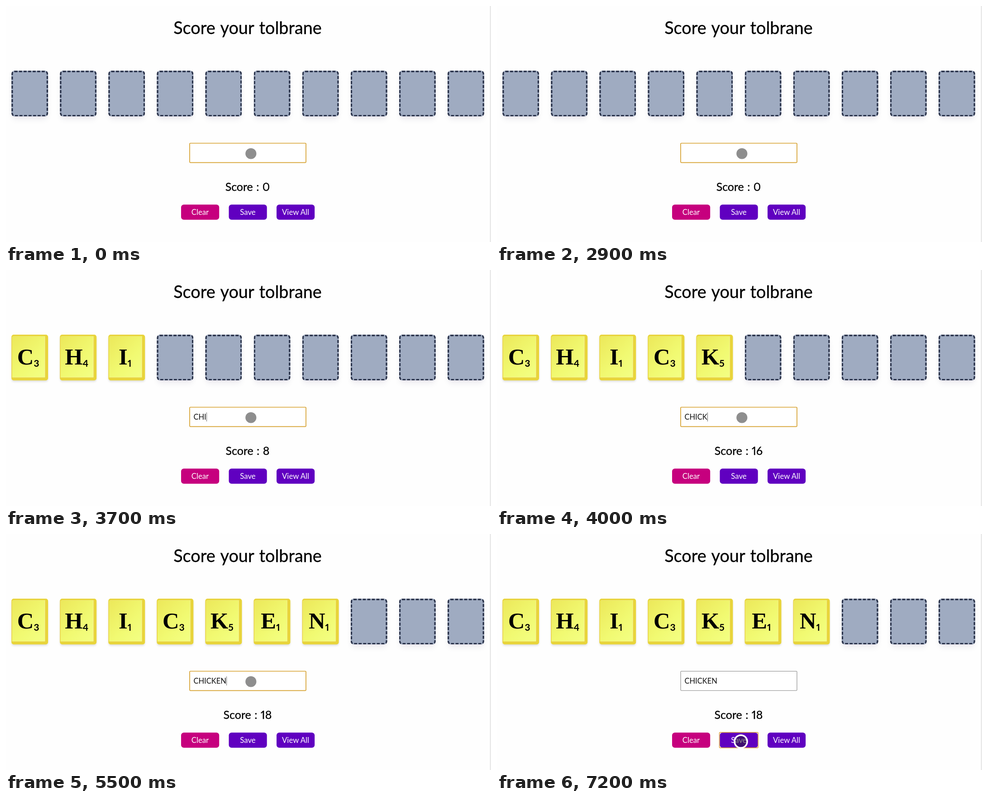
These frames come from a looping animation (1072x522 px, 8 s). An HTML page:

```html
<!DOCTYPE html>
<html lang="en">
<head>
<meta charset="utf-8">
<title>Word score</title>
<style>
  html, body { margin: 0; width: 100%; height: 100%; overflow: hidden; background: #fefefe; }
  #stage { position: relative; width: 1072px; height: 522px; overflow: hidden; }
  svg { position: absolute; left: 0; top: 0; font-family: Lato, "Open Sans", sans-serif; font-variant-numeric: proportional-nums; }
  .tile {
    position: absolute; left: 0; top: 0; width: 96px; height: 120px; box-sizing: border-box;
    transform-origin: 0 0; border-radius: 8px;
    background: #9fabc1; border: 4px dashed #2a334b;
    box-shadow: 0 10px 15px -3px rgba(40, 0, 80, .08), 0 4px 6px -2px rgba(40, 0, 80, .04);
  }
  .tile.on {
    border: solid #e8d43b; border-width: 4px 8px 8px 2px; border-radius: 6px;
    background: linear-gradient(135deg, #ece85a, #f1fa72 60%, #f3ff84);
    box-shadow: inset -1px -1px #f7f5a8, 0 4px 6px -1px rgba(0, 0, 0, .12), 0 2px 4px -1px rgba(0, 0, 0, .06);
  }
  .letter { font: bold 50.6px "Liberation Serif", serif; }
  .digit { font-size: 21px; font-weight: bold; }
  .mid { text-anchor: middle; stroke: #000; stroke-width: .3; }
  .btn { font-size: 16.8px; fill: #fff; text-anchor: middle; }
</style>
</head>
<body>
<div id="stage">
  <svg id="art" width="1072" height="522" viewBox="0 0 1072 522">
    <path d="M1070.5 0V522" stroke="#cfcfcf"/>
    <text class="mid" x="534" y="61.5" font-size="37.8" word-spacing="2">Score your tolbrane</text>
    <g id="letters"></g>
    <rect id="field" x="406" y="303.5" width="257" height="42.8" rx="1.5" fill="#fff"/>
    <text id="typed" x="414.5" y="331" font-size="16.5" fill="#111"></text>
    <path id="caret" d="M0 315V335" stroke="#666"/>
    <text id="score" class="mid" x="534" y="409" font-size="25" word-spacing="1"></text>
    <g id="buttons"></g>
    <rect id="focus" x="491.5" y="438.8" width="85.7" height="34.2" rx="2" fill="none" stroke="#dc9c35" stroke-width="1.4"/>
    <g id="pointer">
      <circle r="14" fill="none" stroke="#fff" stroke-width="3.6"/>
      <circle r="12.1" fill="rgb(30,30,30)" fill-opacity=".5"/>
    </g>
  </svg>
</div>
<script>
const LOOP = 8000, BLINK = 500, BLUR = 7000;
const WORD = 'CHICKEN', POINTS = { C: 3, H: 4, K: 5 };
const KEYS = [3300, 3400, 3700, 3900, 4000, 4500, 4500];
const STOPS = [
  { at: 0, pos: [541.3, 326.5] }, { at: 5900, pos: [541, 385] }, { at: 6000, pos: [541, 446] },
  { at: 6200, pos: [552, 477] }, { at: 6400, pos: [539, 459] }
];

const $ = id => document.getElementById(id);
const points = ch => POINTS[ch] || 1;

function set(el, attrs) {
  for (const k in attrs) el.setAttribute(k, attrs[k]);
  return el;
}

function add(parent, tag, attrs, text = '') {
  const el = document.createElementNS('http://www.w3.org/2000/svg', tag);
  el.textContent = text;
  parent.append(el);
  return set(el, attrs);
}

['Clear', 'Save', 'View All'].forEach((name, i) => {
  const x = 387 + 105.5 * i;
  add($('buttons'), 'rect', { x, y: 439.3, width: 84.2, height: 33.4, rx: 6, fill: i ? '#6000c0' : '#c6007e' });
  add($('buttons'), 'text', { class: 'btn', x: x + 42, y: 462 }, name);
});

// A letter and its digit are centred together on the tile's face
function addFace(ch, centre) {
  const face = add($('letters'), 'g', {});
  const letter = add(face, 'text', { class: 'letter', y: 209 }, ch);
  const digit = add(face, 'text', { class: 'digit', y: 214 }, points(ch));
  const w = letter.getComputedTextLength(), d = digit.getComputedTextLength();
  const x = centre - (w + d) / 2;
  set(letter, { x });
  set(digit, { x: x + w });
  return face;
}

const tiles = Array.from({ length: 10 }, (_, i) => {
  const x = 12 + 107.1 * i, box = document.createElement('div');
  box.style.transform = `translate(${x}px, 143px) scale(.844)`;
  $('stage').insertBefore(box, $('art'));
  return { box, face: i < WORD.length && addFace(WORD[i], x + 37) };
});

function draw(t) {
  const pressed = KEYS.filter(k => k <= t), n = pressed.length;
  const text = WORD.slice(0, n);
  tiles.forEach(({ box, face }, i) => {
    box.className = i < n ? 'tile on' : 'tile';
    if (face) set(face, { visibility: i < n ? 'visible' : 'hidden' });
  });
  $('typed').textContent = text;
  $('score').textContent = 'Score : ' + [...text].reduce((sum, ch) => sum + points(ch), 0);

  // Each key press restarts the blinking
  const focused = t < BLUR, since = t - (n ? pressed[n - 1] : -600);
  const lit = focused && since % (2 * BLINK) < BLINK;
  const caretX = 415.3 + $('typed').getComputedTextLength();
  set($('caret'), { transform: `translate(${caretX})`, opacity: lit ? 1 : 0 });
  set($('field'), { stroke: focused ? '#d6a12f' : '#858585', 'stroke-width': focused ? 1.7 : 1.1 });
  set($('focus'), { opacity: focused ? 0 : Math.min(1, (t - BLUR + 100) / 300) });
  set($('pointer'), { transform: `translate(${STOPS.filter(s => s.at <= t).pop().pos})` });
}

const start = performance.now();
function tick() {
  draw((performance.now() - start) % LOOP);
  requestAnimationFrame(tick);
}
tick();
</script>
</body>
</html>
```
